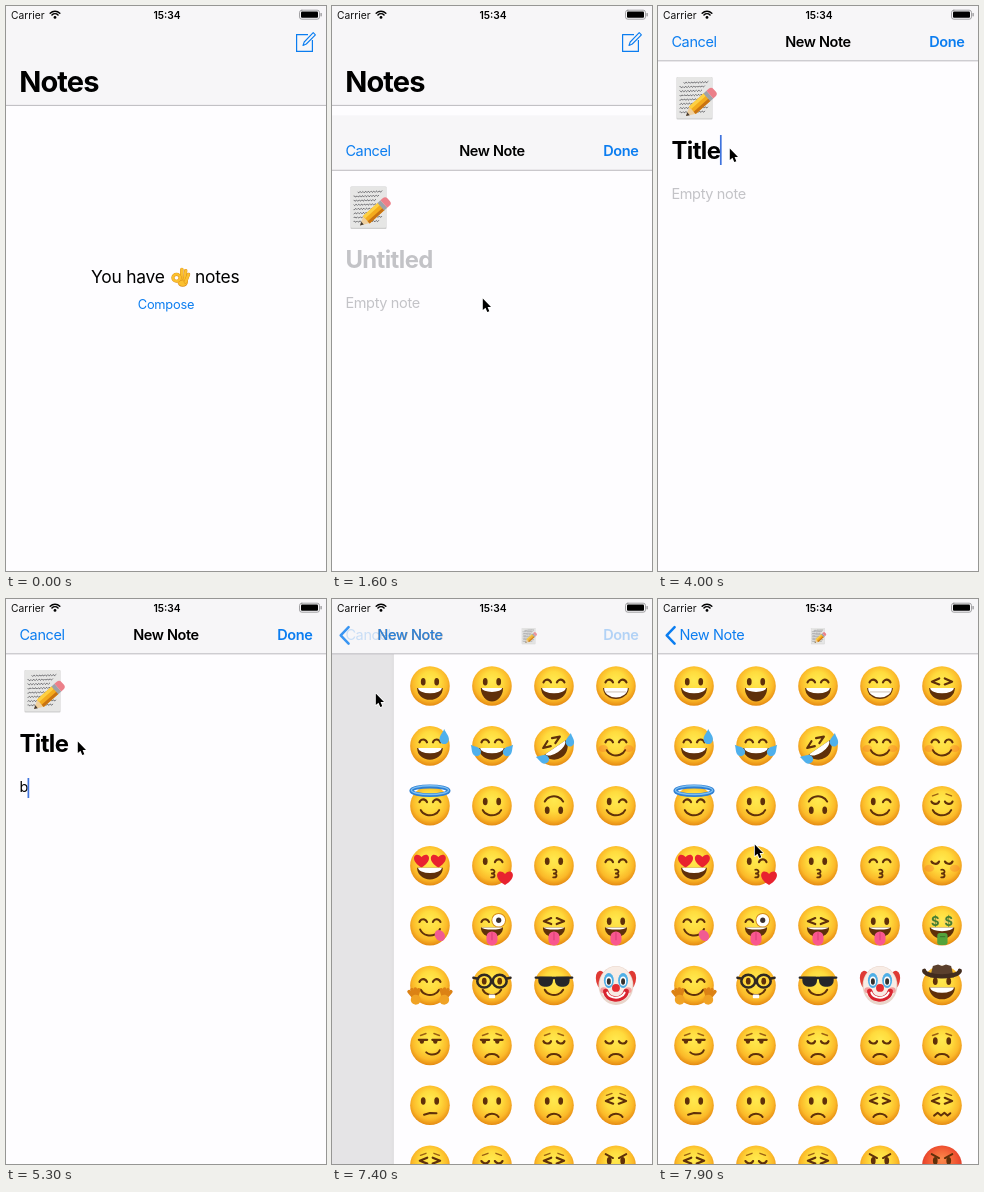
An HTML page with a canvas that plays this animation: 320x565 px, repeating every 8000 ms.

```html
<!DOCTYPE html>
<html lang="en">
<head>
<meta charset="utf-8">
<title>Notes</title>
<style>
  html, body { margin: 0; width: 100%; height: 100%; overflow: hidden; background: #fefdff; }
  canvas { display: block; width: 320px; height: 565px; }
</style>
</head>
<body>
<canvas id="stage"></canvas>
<script>
const W = 320, H = 565, LOOP = 8000, STEP = 100, TAU = Math.PI * 2;
const BLUE = '#0b7df0', PAGE = '#fefdff', BAR = '#f7f6f8', HINT = '#c3c3c7', BROWN = '#5f300a';
const SHEET_START = 1350, PUSH_START = 7150;
const FOCUS = 2700, TITLE_KEYS = [3100, 3300, 3500, 3700, 3900];
const NEXT_FIELD = 4400, BODY_KEYS = [5200, 5500, 6000, 6200];
const POINTER = [[800, 235, 566], [1200, 150, 291], [1800, 150, 291], [2400, 71, 141],
  [6400, 71, 141], [6800, 55, 120], [7100, 43, 93], [7500, 43, 93], [7900, 96, 244]];
// Each face: eyes, mouth, then extras.
const FACES = [
  'oD oO nD nG xD', 'nDd nDj xDRj nsc nsc', 'nsa os osF ws usb', 'hD wke ok nk ukc',
  'nt zp xp op $S', 'nsy gq vs K oDH', 'lrb lfb ufb uf ofb', 'om of of xfb x~b',
  'xfb ufb xfb ofv ofvX'].map(row => row.split(' '));

const canvas = document.getElementById('stage');
const c = canvas.getContext('2d');
const dpr = window.devicePixelRatio || 1;
canvas.width = W * dpr;
canvas.height = H * dpr;

const clamp = v => Math.max(0, Math.min(1, v));

// Fraction of the transition still to travel: critically damped spring.
function remaining(t, start) {
  if (t < start) return 1;
  const x = (t - start) * 0.01215;
  return x > 8.5 ? 0 : (1 + x) * Math.exp(-x);
}

function at(x, y, draw, scale = 1, angle = 0) {
  c.save();
  c.translate(x, y);
  c.rotate(angle);
  c.scale(scale, scale);
  draw();
  c.restore();
}

function faded(alpha, draw) {
  c.save();
  c.globalAlpha *= clamp(alpha);
  draw();
  c.restore();
}

function rect(x, y, w, h, fill) {
  c.fillStyle = fill;
  c.fillRect(x, y, w, h);
}

function box(x, y, w, h, r, fill) {
  c.beginPath();
  c.roundRect(x, y, w, h, r);
  c.fillStyle = fill;
  c.fill();
}

function oval(x, y, rx, ry, fill, angle = 0) {
  c.beginPath();
  c.ellipse(x, y, rx, ry, angle, 0, TAU);
  c.fillStyle = fill;
  c.fill();
}

function stroke(width, color) {
  c.lineWidth = width;
  c.strokeStyle = color;
  c.stroke();
}

function curve(x, y, rx, ry, from, to, width = 0.1, color = BROWN) {
  c.beginPath();
  c.ellipse(x, y, rx, ry, 0, from * Math.PI, to * Math.PI);
  c.lineCap = 'round';
  stroke(width, color);
}

function path(...pts) {
  c.beginPath();
  pts.forEach(([x, y], i) => i ? c.lineTo(x, y) : c.moveTo(x, y));
}

function line(width, color, ...pts) {
  path(...pts);
  c.lineCap = c.lineJoin = 'round';
  stroke(width, color);
}

function shape(fill, ...pts) {
  path(...pts);
  c.closePath();
  c.fillStyle = fill;
  c.fill();
}

function setFont(size, weight, tracking) {
  c.font = `${weight} ${size}px Inter, "Liberation Sans", sans-serif`;
  c.letterSpacing = `${tracking * size}px`;
}

function text(str, x, y, size, weight, color, tracking = -0.026, align = 'left') {
  setFont(size, weight, tracking);
  const w = c.measureText(str).width;
  c.fillStyle = color;
  c.fillText(str, align === 'center' ? x - w / 2 : align === 'right' ? x - w : x, y);
  return w;
}

function heart(x, y, s) {
  at(x, y, () => {
    c.beginPath();
    c.moveTo(0, 1);
    c.bezierCurveTo(-1.9, -0.1, -0.9, -1.5, 0, -0.5);
    c.bezierCurveTo(0.9, -1.5, 1.9, -0.1, 0, 1);
    c.fillStyle = '#e8222f';
    c.fill();
  }, s);
}

function drop(x, y, s, angle) {
  at(x, y, () => {
    c.beginPath();
    c.moveTo(0, -1.3);
    c.bezierCurveTo(0.3, -0.6, 0.8, -0.2, 0.7, 0.4);
    c.bezierCurveTo(0.5, 1.2, -0.5, 1.2, -0.7, 0.4);
    c.bezierCurveTo(-0.8, -0.2, -0.3, -0.6, 0, -1.3);
    c.fillStyle = '#4fb0ec';
    c.fill();
  }, s, angle);
}

function eye(kind, side) {
  const x = 0.34 * side, y = -0.22;
  if (kind === 'w') kind = side < 0 ? 'o' : 'n';
  if (kind === 'z' && side < 0) kind = 'n';
  if (kind === 'o') oval(x, y, 0.12, 0.19, BROWN);
  if (kind === 'n') curve(x, y + 0.1, 0.2, 0.2, 1.1, 1.9, 0.11);
  if (kind === 'u') curve(x, y - 0.04, 0.2, 0.16, 0.1, 0.9, 0.11);
  if (kind === 'x') line(0.11, BROWN, [x - 0.2 * side, y - 0.16], [x + 0.17 * side, y], [x - 0.2 * side, y + 0.14]);
  if (kind === 'h') heart(x * 1.25, y - 0.04, 0.35);
  if (kind === '$') {
    oval(x, y, 0.25, 0.25, '#f8d660');
    text('$', x, y + 0.24, 0.65, 700, '#457e31', 0, 'center');
  }
  if (kind === 'l') {
    oval(x - 0.07, y + 0.02, 0.11, 0.12, BROWN);
    line(0.11, BROWN, [x - 0.22, y - 0.06], [x + 0.2, y - 0.06]);
  }
  if (kind === 'z') {
    oval(x, y - 0.05, 0.37, 0.37, '#d58b16');
    oval(x, y - 0.05, 0.32, 0.32, '#fff');
    oval(x, y - 0.05, 0.13, 0.14, '#3a3030');
  }
  if (kind === 'g') {
    oval(x * 1.15, y, 0.12, 0.17, BROWN);
    curve(x * 1.15, y, 0.35, 0.32, 0, 2, 0.13, '#302923');
    line(0.12, '#302923', [0.7 * side, y - 0.12], [0.94 * side, y - 0.17]);
  }
  if (kind === 'v') {
    box(x * 1.24 - 0.37, y - 0.22, 0.74, 0.5, [0.06, 0.06, 0.3, 0.3], '#25262a');
    line(0.12, '#25262a', [0, y - 0.16], [0.92 * side, y - 0.18]);
  }
}

function grin(rx, ry, teeth) {
  c.save();
  c.beginPath();
  c.ellipse(0, 0.1, rx, ry, 0, 0, Math.PI);
  c.closePath();
  c.fillStyle = BROWN;
  c.fill();
  c.clip();
  oval(0, 0.1, rx * 0.92, teeth, '#fff');
  c.restore();
}

function mouth(kind) {
  if (kind === 'D') grin(0.65, 0.6, 0.27);
  if (kind === 'O') grin(0.56, 0.68, 0.2);
  if (kind === 'G') {
    grin(0.65, 0.56, 0.48);
    line(0.04, '#c4b5a2', [-0.5, 0.3], [0.5, 0.3]);
  }
  if (kind === 's' || kind === 'q') curve(0, 0.06, 0.5, 0.42, 0.12, 0.88);
  if (kind === 'q') box(-0.16, 0.45, 0.32, 0.2, 0.04, '#fff');
  if (kind === 'f') curve(0, 0.68, 0.36, 0.25, 1.12, 1.88);
  if (kind === 'm') line(0.1, BROWN, [-0.3, 0.48], [0, 0.39], [0.33, 0.4]);
  if (kind === 'r') curve(0.12, 0.2, 0.38, 0.26, 0.06, 0.8);
  if (kind === '~') line(0.1, BROWN, [-0.4, 0.52], [-0.22, 0.38], [-0.05, 0.52], [0.12, 0.38], [0.28, 0.52], [0.42, 0.4]);
  if (kind === 'k') {
    curve(0, 0.3, 0.13, 0.1, 1.4, 2.5, 0.09);
    curve(0, 0.49, 0.13, 0.1, 1.5, 2.6, 0.09);
  }
  if (kind === 'p') {
    grin(0.56, 0.5, 0.1);
    box(-0.28, 0.3, 0.56, 0.7, 0.27, '#f9578f');
    line(0.05, '#d93c76', [0, 0.36], [0, 0.72]);
  }
  if (kind === 't') {
    curve(0, 0.06, 0.52, 0.44, 0.08, 0.9);
    oval(0.5, 0.5, 0.24, 0.3, '#f15b92', -0.6);
  }
  if (kind === 'S') {
    grin(0.62, 0.56, 0.18);
    box(-0.24, 0.38, 0.52, 0.6, 0.14, '#53a33b');
    line(0.06, '#3d7c2d', [-0.08, 0.56], [0.14, 0.56]);
  }
}

function hand(side) {
  at(side * 0.74, 0.62, () => {
    for (let i = -1; i < 3; i++) {
      const a = -0.5 * Math.PI + side * (i - 0.5) * 0.4;
      line(0.18, '#dc8215', [0, 0.1], [Math.cos(a) * 0.44, Math.sin(a) * 0.44]);
    }
    oval(0, 0.1, 0.25, 0.25, '#f0a224');
  }, 1, side * 0.2);
}

const EXTRAS = {
  b() { [-1, 1].forEach(s => line(0.07, '#9b6014', [0.2 * s, -0.6], [0.48 * s, -0.5])); },
  v() { [-1, 1].forEach(s => line(0.1, BROWN, [0.15 * s, -0.36], [0.52 * s, -0.56])); },
  c() { [-1, 1].forEach(s => oval(0.64 * s, 0.13, 0.24, 0.18, 'rgba(240,70,40,.22)')); },
  d() { drop(0.72, -0.42, 0.33, 0); },
  j() { [-1, 1].forEach(s => drop(0.82 * s, 0.24, 0.3, 0.7 * s)); },
  e() { heart(0.66, 0.6, 0.37); },
  a() { curve(0, -0.76, 0.94, 0.22, 0, 2, 0.2, '#2f7fd2'); curve(0, -0.79, 0.94, 0.22, 0, 2, 0.07, '#7cc0f4'); },
  y() { hand(-1); hand(1); },
  H() {
    shape('#5b402d', [-0.6, -0.4], [-0.46, -0.98], [-0.2, -1.06], [0, -0.98], [0.2, -1.06], [0.46, -0.98], [0.6, -0.4]);
    curve(0, -0.76, 0.9, 0.3, 0.02, 0.98, 0.22, '#422c1e');
  }
};

function clown() {
  [-1, 1].forEach(s => oval(0.72 * s, -0.25, 0.28, 0.5, '#df3a34', 0.25 * s));
  oval(0, 0, 0.88, 0.99, '#e9d5ca');
  oval(0, -0.06, 0.82, 0.9, '#f8ece5');
  [-1, 1].forEach(s => {
    oval(0.36 * s, -0.25, 0.25, 0.38, '#4fafe6');
    oval(0.36 * s, -0.22, 0.16, 0.23, '#fff');
    oval(0.36 * s, -0.2, 0.1, 0.16, '#34312f');
    oval(0.62 * s, 0.24, 0.17, 0.15, '#f3a0a0');
  });
  curve(0, 0.22, 0.52, 0.46, 0.06, 0.94, 0.28, '#d8242f');
  curve(0, 0.24, 0.46, 0.38, 0.1, 0.9, 0.1, '#fff');
  oval(0, 0.12, 0.2, 0.2, '#e52d32');
}

function skin(red) {
  const glow = c.createRadialGradient(0, -0.3, 0, 0, -0.12, 1.12);
  const stops = red ? ['#fb8a4c', '#f5683a', '#ec4a2e', '#cf3322'] : ['#ffe94f', '#ffdb3d', '#fbb929', '#e58a12'];
  [0, 0.45, 0.78, 1].forEach((stop, i) => glow.addColorStop(stop, stops[i]));
  return glow;
}

function face(spec) {
  if (spec === 'K') return clown();
  oval(0, 0, 1, 1, skin(spec.includes('X')));
  if (spec.includes('F')) c.scale(1, -1);
  if (spec.includes('R')) c.rotate(-0.6);
  eye(spec[0], -1);
  eye(spec[0], 1);
  mouth(spec[1]);
  for (const key of spec.slice(2)) if (EXTRAS[key]) EXTRAS[key]();
}

function memo() {
  box(-18.5, -21, 36, 42.5, 1, '#cfcfcf');
  box(-18, -21, 35, 41.3, 1, '#e6e6e5');
  c.setLineDash([4, 1.2, 2.5, 1]);
  for (let row = 0; row < 8; row++) {
    const y = -15.5 + row * 4.2;
    c.beginPath();
    for (let x = row ? -15 : -11; x < 13 - (row % 3) * 3; x += 0.6) c.lineTo(x, y + Math.sin(x * 2.3 + row) * 0.6 - x * 0.03);
    stroke(0.9, '#5c5c60');
  }
  c.setLineDash([]);
  at(-9, 18, () => {
    shape('#efcf9d', [0, 0], [9, -5], [9, 5]);
    shape('#453a32', [0, 0], [3.4, -1.9], [3.4, 1.9]);
    rect(8.5, -5, 20, 10, '#f4ab1d');
    rect(8.5, -5, 20, 3.2, '#fdd043');
    rect(8.5, 2, 20, 3, '#c97312');
    rect(28, -5.1, 4, 10.2, '#9da2a8');
    box(32, -5.1, 6.5, 10.2, [0, 3.5, 3.5, 0], '#ec808a');
  }, 1, -0.73);
}

function okHand() {
  const gold = '#fbc02f', edge = '#d98a18';
  const fingers = [[[1, 2], [1.4, -7.6]], [[4, 3], [5.2, -6.4]], [[5, 5], [8, -2.6]]];
  oval(2.2, 5, 5.2, 4.8, edge);
  oval(2.2, 4.7, 4.8, 4.4, gold);
  fingers.forEach(f => { line(3.4, edge, ...f); line(2.6, gold, ...f); });
  curve(-4, 0.8, 3.6, 3.4, 0, 2, 3.1, edge);
  curve(-4, 0.7, 3.6, 3.4, 0, 2, 2.4, gold);
}

function bar(height) {
  rect(0, 0, W, height, BAR);
  rect(0, height - 0.6, W, 0.9, '#b5b4b8');
}

function statusBar() {
  text('Carrier', 5, 12.5, 10.24, 400, '#111', 0);
  text('15:34', 161, 12.5, 10.24, 600, '#000', 0, 'center');
  [6.8, 4.3].forEach(r => curve(49, 12, r, r, 1.25, 1.75, 1.5, '#000'));
  oval(49, 11.4, 1.4, 1.4, '#000');
  c.beginPath();
  c.roundRect(293.5, 4.2, 20, 9, 2.3);
  stroke(0.8, '#8c8c8e');
  box(295, 5.6, 17, 6.2, 1, '#000');
  box(314.5, 7, 1.2, 3.4, 0.6, '#8c8c8e');
}

function notesScreen() {
  rect(0, 0, W, H, PAGE);
  bar(99.5);
  text('Notes', 13.2, 86, 29, 700, '#000', -0.03);
  c.lineCap = 'butt';
  path([302, 28.6], [290.6, 28.6], [290.6, 45.4], [306.4, 45.4], [306.4, 34]);
  stroke(1.2, BLUE);
  line(1.1, BLUE, [297, 39.5], [298.2, 36], [307.2, 26.7], [309.4, 28.8], [300.3, 38], [297, 39.5]);
  text('You have', 85, 277, 17.4, 400, '#000', -0.012);
  at(174.5, 271, okHand);
  text('notes', 189, 277, 17.4, 400, '#000', -0.012);
  text('Compose', 160, 303, 12.8, 400, BLUE, -0.016, 'center');
}

function field(value, hint, y, size, weight, tracking, focused, caretTop, caretHeight) {
  const w = text(value || hint, 13.4, y, size, weight, value ? '#000' : HINT, tracking);
  if (focused) rect(13 + (value ? w : 0), caretTop, 1.7, caretHeight, '#3f73dd');
}

function noteContent(t) {
  rect(0, 0, W, H, PAGE);
  at(37, 92, memo);
  const typed = (word, keys) => word.slice(0, keys.filter(k => k <= t).length);
  const lastEdit = Math.max(...[FOCUS, ...TITLE_KEYS, NEXT_FIELD, ...BODY_KEYS].filter(k => k <= t), 0);
  const caret = t >= FOCUS && t < PUSH_START && (t - lastEdit) % 1000 < 700;
  field(typed('Title', TITLE_KEYS), 'Untitled', 153, 23.9, 700, -0.025, caret && t < NEXT_FIELD, 129, 30);
  field(typed('body', BODY_KEYS), 'Empty note', 193, 14.5, 400, -0.024, caret && t >= NEXT_FIELD, 179, 20);
}

function picker() {
  rect(0, 55, W, H, PAGE);
  FACES.forEach((row, j) => row.forEach((spec, i) => {
    at(36 + 62 * i, 87 + 59.9 * j, () => face(spec), 19.8);
  }));
}

function noteScreen(t) {
  const r = remaining(t, PUSH_START), pushing = r < 1;
  at(-96 * (1 - r), 0, () => noteContent(t));
  if (pushing) {
    rect(0, 55, W * r, H, `rgba(0,0,0,${0.12 * (1 - r)})`);
    at(W * r, 0, () => {
      const shade = c.createLinearGradient(-4, 0, 0, 0);
      shade.addColorStop(0, 'rgba(0,0,0,0)');
      shade.addColorStop(1, `rgba(0,0,0,${0.15 * r})`);
      rect(-4, 55, 4, H, shade);
      picker();
    });
  }
  bar(55);
  faded(r, () => text('Cancel', 13.4, 41, 14.5, 400, BLUE));
  faded(r * 1.5, () => text('Done', 306.4, 41, 14.5, 600, BLUE, -0.026, 'right'));
  if (!pushing) {
    text('New Note', 160, 41, 14.5, 600, '#000', -0.026, 'center');
    return;
  }
  const shift = 124 * r;
  faded(r * 2, () => text('New Note', Math.min(127, 21.3 + shift), 41, 14.5, 600, '#000'));
  faded(1 - r, () => {
    text('New Note', 21.5 + shift, 41, 14.5, 400, BLUE);
    line(2.5, BLUE, [16.6, 28.2], [8.7, 36.4], [16.6, 44.6]);
    at(160 + 190 * r, 37, memo, 0.38);
  });
}

function pointer(t) {
  const next = POINTER.findIndex(k => k[0] > t);
  if (!next) return;
  const b = POINTER[next < 0 ? POINTER.length - 1 : next];
  const a = next < 0 ? b : POINTER[next - 1];
  const p = b === a ? 0 : (t - a[0]) / (b[0] - a[0]);
  const e = p * p * (3 - 2 * p);
  at(a[1] + (b[1] - a[1]) * e + 0.8, a[2] + (b[2] - a[2]) * e + 1.5, () => {
    path([0, 0], [0, 11.6], [2.7, 9.2], [4.5, 13.6], [6.5, 12.8], [4.8, 8.5], [8.2, 8.4]);
    c.closePath();
    c.lineJoin = 'round';
    stroke(1.5, '#fff');
    c.fillStyle = '#000';
    c.fill();
  });
}

function draw(t) {
  c.setTransform(dpr, 0, 0, dpr, 0, 0);
  const r = remaining(t, SHEET_START);
  if (r > 0) notesScreen();
  if (r < 1) at(0, H * r, () => noteScreen(t));
  statusBar();
  pointer(t);
}

let shown = -1;
const began = performance.now();
function tick() {
  const t = Math.floor(((performance.now() - began) % LOOP) / STEP) * STEP;
  if (t !== shown) draw(shown = t);
  requestAnimationFrame(tick);
}
tick();
</script>
</body>
</html>
```
